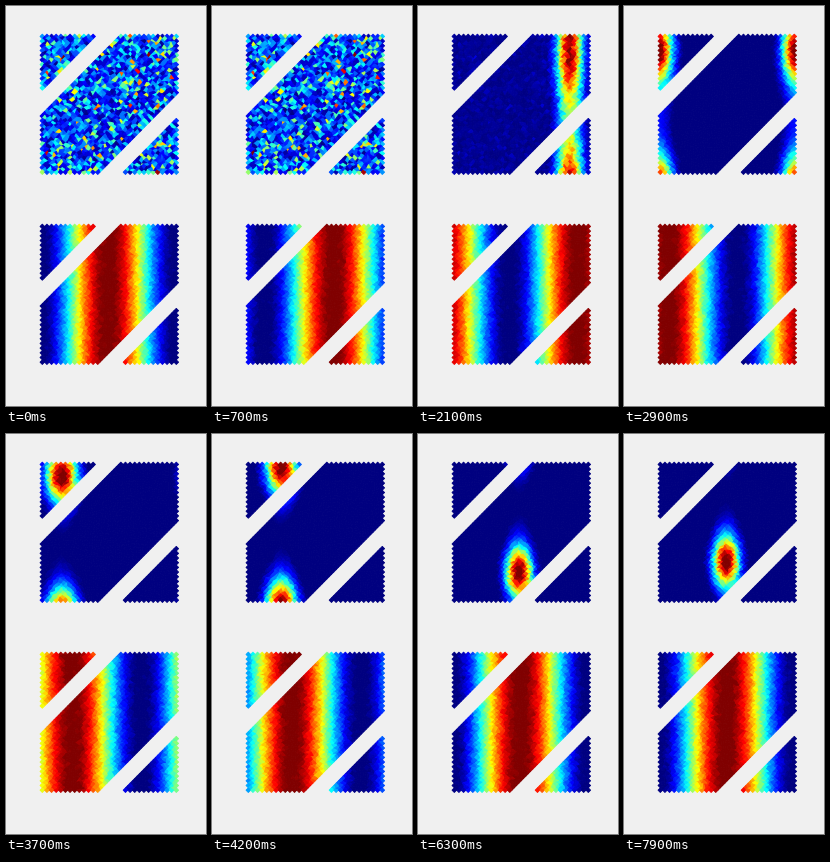
These frames come from a looping animation (200x400 px, 8000 ms). A matplotlib script:

```python
import numpy as np
import matplotlib.pyplot as plt
from matplotlib.animation import FuncAnimation
from matplotlib.collections import PolyCollection

W, H, DPI = 200, 400, 100
FRAMES, STEP = 80, 100
CX, CY, DROP = 103.3, 98.3, 190
DX, DY, N = 2.31, 2.34, 29
PERIOD = 138.0
SIDES = ((0, -1), (1, 0), (0, 1), (-1, 0))

rng = np.random.default_rng(4)

# diamond lattice with two diagonal gaps
axis = np.arange(-N, N + 1)
i, j = np.meshgrid(axis, axis)
s = i + j
keep = (s % 2 == 0) & ((abs(s) <= 24) | (abs(s) >= 36))
i, j = i[keep], j[keep]
x, y = CX + DX * i, CY + DY * j

# corners shared by four cells are jittered, the outline stays regular
size = 2 * N + 3
shared = np.zeros((size, size))
for di, dj in SIDES:
    np.add.at(shared, (i + di + N + 1, j + dj + N + 1), 1)
jitter = rng.normal(0, 0.75, (size, size, 2)).clip(-1.5, 1.5)
jitter *= (shared == 4)[..., None]

seed_rates = np.clip(rng.gamma(1.9, 0.12, x.size), 0, 1)
grain = rng.normal(0, 1, x.size)


def jet(v):
    v = np.clip(v, 0, 1)[:, None]
    return np.clip(1.5 - abs(4 * v - np.array([3, 2, 1])), 0, 1)


def wrap_cos(d):
    return np.cos(2 * np.pi * d / PERIOD)


def input_x(t):
    return 102.3 + PERIOD * min(t, 5) / 5


def bump_x(t):
    lag = 11.5 * (1 - np.exp(-t / 1.5))
    return input_x(t) - lag * np.exp(-max(t - 5, 0) / 0.6)


def activity(t, noise):
    cy = np.interp(t, [2.1, 3.7, 4.8, 6.3, 7.9], [48, 43, 24, 1, -10])
    kx = np.interp(t, [2.1, 3.7, 6.3], [5.6, 4, 5.6])
    ky = np.interp(t, [1.3, 2.1, 3.7], [0.08, 0.28, 1.4])
    bump = np.exp(kx * (wrap_cos(x - bump_x(t)) - 1)
                  + ky * (wrap_cos(y - cy) - 1))
    rough = np.exp(-max(t - 1.5, 0) / 0.6)
    bump = 1.15 * bump * (1 + 0.12 * rough * grain + 0.01 * noise) - 0.08
    bump = np.maximum(bump, 0)
    mix = 1 / (1 + np.exp(-6.5 * (t - 1.75)))
    return (1 - mix) * seed_rates * (1 + 0.02 * noise) + mix * bump


def drive(t, noise):
    return 0.5 + 0.52 * wrap_cos(x - input_x(t)) + 0.012 * noise


def cells(offset):
    corners = []
    for di, dj in SIDES:
        point = np.column_stack([x + di * DX, y + dj * DY + offset])
        corners.append(point + jitter[i + di + N + 1, j + dj + N + 1])
    return PolyCollection(np.stack(corners, axis=1), linewidths=0.6)


fig = plt.figure(figsize=(W / DPI, H / DPI), dpi=DPI, facecolor="#f0f0f0")
ax = fig.add_axes([0, 0, 1, 1])
ax.set_xlim(0, W)
ax.set_ylim(H, 0)
ax.axis("off")
top, bottom = cells(0), cells(DROP)
ax.add_collection(top, autolim=False)
ax.add_collection(bottom, autolim=False)


def update(frame):
    t = frame * STEP / 1000
    noise = np.random.default_rng(100 + frame).normal(0, 1, (2, x.size))
    top.set_color(jet(activity(t, noise[0])))
    bottom.set_color(jet(drive(t, noise[1])))
    return top, bottom


anim = FuncAnimation(fig, update, frames=FRAMES, interval=STEP,
                     repeat=True, repeat_delay=0)
plt.show()
```
